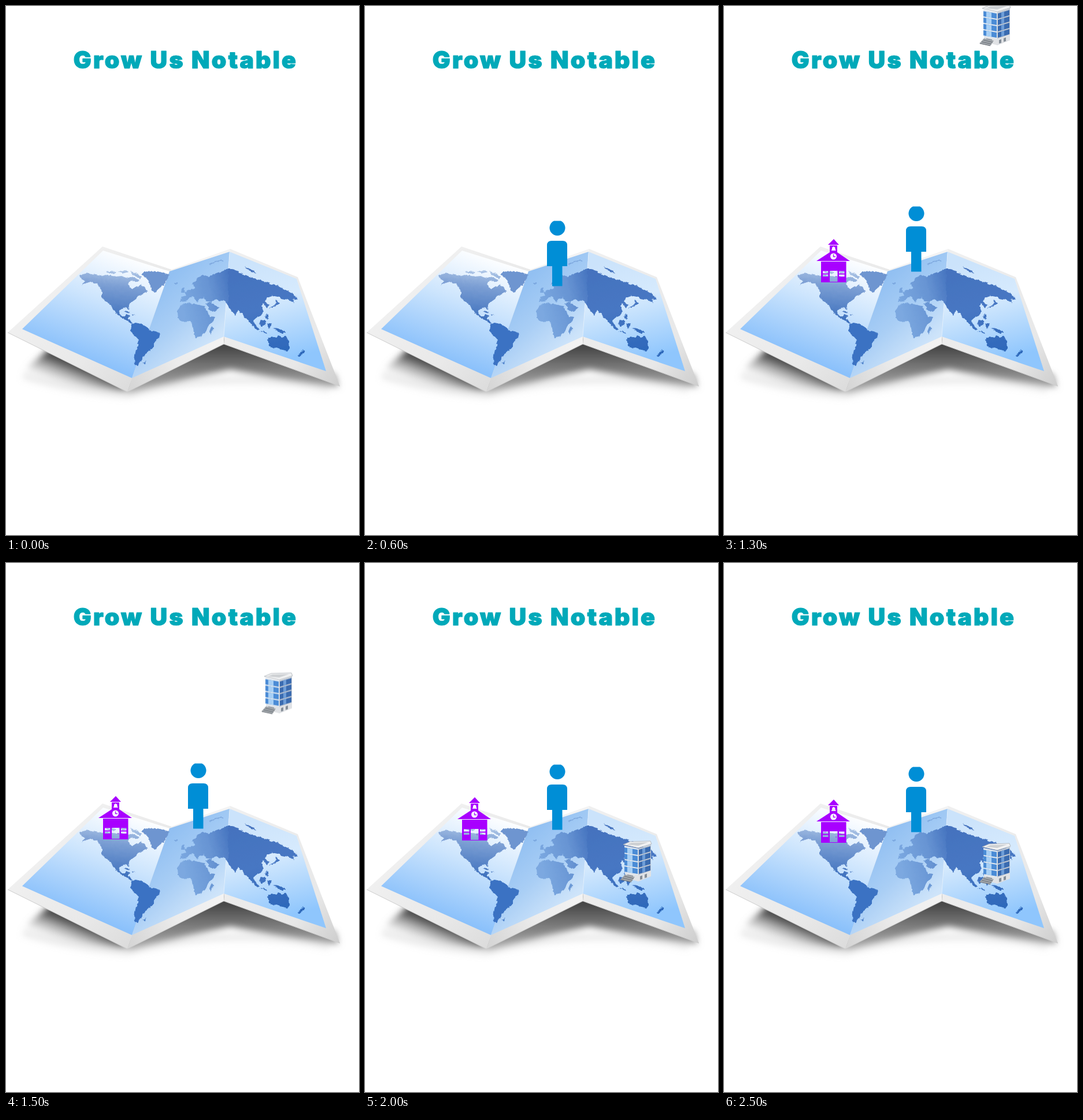
An HTML page for the animation above (2600 ms loop, 611 px wide and 917 px high).

```html
<!DOCTYPE html>
<html lang="en">
<head>
<meta charset="utf-8">
<title>Map drop</title>
<style>
html, body { margin: 0; width: 100%; height: 100%; overflow: hidden; background: #fff; }
svg { display: block; width: 611px; height: 917px; }
.title { font: 900 41px Inter, "Open Sans", sans-serif; letter-spacing: 3.2px; fill: #00a9b9; stroke: #00a9b9; stroke-width: 1.2; stroke-linejoin: round; }
#person, #school, #office, #icons { animation: 2600ms step-end infinite; }
#person { animation-name: person; }
#school { animation-name: school; }
#office { animation-name: office; }
#icons { animation-name: shake; }

@keyframes person {
  0% { transform: translateY(-600px); }
  7.69% { transform: translateY(-413px); animation-timing-function: steps(4); }
  23.07% { transform: translateY(25px); }
  30.76%, 100% { transform: none; }
}
@keyframes school {
  0% { transform: translateY(-600px); }
  30.76% { transform: translateY(-390px); }
  34.61% { transform: translateY(-290px); animation-timing-function: steps(3); }
  46.15% { transform: translateY(9px); }
  49.99%, 100% { transform: none; }
}
@keyframes office {
  0% { transform: translateY(-700px); }
  49.99% { transform: translateY(-482px); animation-timing-function: steps(4); }
  65.38% { transform: translateY(-97px); }
  69.22%, 100% { transform: none; }
}
@keyframes shake {
  0% { transform: none; }
  73.07% { transform: translateY(9px); }
  76.92% { transform: translateY(2px); }
  80.76% { transform: translateY(-5px); animation-timing-function: steps(4); }
  96.15%, 100% { transform: translateY(6px); }
}
</style>
</head>
<body>
<svg viewBox="0 0 611 917">
  <defs>
    <linearGradient id="paperL" gradientUnits="userSpaceOnUse" x1="60" y1="500" x2="210" y2="669">
      <stop offset="0" stop-color="#f0f0f0"/><stop offset=".6" stop-color="#e9e9e9"/><stop offset="1" stop-color="#dcdcdc"/>
    </linearGradient>
    <linearGradient id="paperM" gradientUnits="userSpaceOnUse" x1="215" y1="660" x2="380" y2="580">
      <stop offset="0" stop-color="#d6d6d6"/><stop offset=".5" stop-color="#ececec"/><stop offset="1" stop-color="#f3f3f3"/>
    </linearGradient>
    <linearGradient id="paperR" gradientUnits="userSpaceOnUse" x1="385" y1="480" x2="578" y2="650">
      <stop offset="0" stop-color="#efefef"/><stop offset=".7" stop-color="#e8e8e8"/><stop offset="1" stop-color="#cfcfcf"/>
    </linearGradient>
    <linearGradient id="seaL" gradientUnits="userSpaceOnUse" x1="185" y1="425" x2="120" y2="605">
      <stop offset="0" stop-color="#fdfeff"/><stop offset=".45" stop-color="#cde5fd"/><stop offset="1" stop-color="#8bc1fb"/>
    </linearGradient>
    <linearGradient id="seaM" gradientUnits="userSpaceOnUse" x1="270" y1="480" x2="360" y2="580">
      <stop offset="0" stop-color="#92c0f2"/><stop offset=".5" stop-color="#a9cef5"/><stop offset="1" stop-color="#cee4fa"/>
    </linearGradient>
    <linearGradient id="seaR" gradientUnits="userSpaceOnUse" x1="430" y1="440" x2="475" y2="615">
      <stop offset="0" stop-color="#cbe3fb"/><stop offset=".4" stop-color="#d6eafd"/><stop offset="1" stop-color="#8fc6fd"/>
    </linearGradient>
    <linearGradient id="landL" gradientUnits="userSpaceOnUse" x1="205" y1="455" x2="195" y2="545">
      <stop offset="0" stop-color="#b3cae8"/><stop offset=".35" stop-color="#7c9fd4"/><stop offset="1" stop-color="#3d70bd"/>
    </linearGradient>
    <linearGradient id="landM" gradientUnits="userSpaceOnUse" x1="300" y1="500" x2="386" y2="480">
      <stop offset="0" stop-color="#7ba8e0"/><stop offset=".6" stop-color="#6794d3"/><stop offset="1" stop-color="#4a78c2"/>
    </linearGradient>
    <linearGradient id="landR" gradientUnits="userSpaceOnUse" x1="410" y1="455" x2="450" y2="600">
      <stop offset="0" stop-color="#4472be"/><stop offset=".5" stop-color="#4777c3"/><stop offset="1" stop-color="#2f69bb"/>
    </linearGradient>
    <linearGradient id="shadeL" gradientUnits="userSpaceOnUse" x1="140" y1="632" x2="126" y2="668">
      <stop offset="0" stop-color="#4c4c4c"/><stop offset="1" stop-color="#aaa" stop-opacity=".1"/>
    </linearGradient>
    <linearGradient id="shadeR" gradientUnits="userSpaceOnUse" x1="375" y1="590" x2="375" y2="668">
      <stop offset="0" stop-color="#444"/><stop offset=".45" stop-color="#777"/><stop offset="1" stop-color="#aaa"/>
    </linearGradient>
    <filter id="soft" x="-20%" y="-40%" width="140%" height="180%"><feGaussianBlur stdDeviation="6"/></filter>
    <filter id="coast" x="-5%" y="-5%" width="110%" height="110%">
      <feTurbulence type="fractalNoise" baseFrequency=".16" numOctaves="2" seed="4"/>
      <feDisplacementMap in="SourceGraphic" scale="5" xChannelSelector="R" yChannelSelector="G"/>
    </filter>
  </defs>

  <rect width="611" height="917" fill="#fff"/>
  <text class="title" x="311" y="108" text-anchor="middle">Grow Us Notable</text>

  <g id="shadow" filter="url(#soft)">
    <path d="M34 628L80 590L205 650L208 668Q90 658 34 628Z" fill="url(#shadeL)"/>
    <path d="M205 655L377 560L570 640L576 661Q480 648 388 630Q300 648 212 671Z" fill="url(#shadeR)"/>
    <path d="M30 640Q110 666 210 674Q390 628 560 664" fill="none" stroke="#bbb" stroke-width="12" opacity=".3"/>
  </g>

  <g id="paper">
    <path d="M3 566L167 417L287 457L210 669Z" fill="url(#paperL)"/>
    <path d="M286 457L388 421L377 586L210 669Z" fill="url(#paperM)"/>
    <path d="M388 421L505 470L578 659L377 586Z" fill="url(#paperR)"/>
    <path d="M3 566L210 669L377 586L578 659" fill="none" stroke="#cdcdcd" stroke-width="1"/>
    <path d="M28 560L168 424L283 460L218 645Z" fill="url(#seaL)"/>
    <path d="M283 460L387 426L377 573L218 645Z" fill="url(#seaM)"/>
    <path d="M387 426L503 473L554 633L377 573Z" fill="url(#seaR)"/>
    <path d="M387 426L377 573" stroke="#fff" stroke-opacity=".35"/>
  </g>

  <g id="land" filter="url(#coast)">
    <g fill="url(#landL)">
      <path d="M128 468L136 463L150 465L165 468L176 466L190 469L200 468L212 472L222 470L231 476L226 479L217 475L211 482L218 490L224 487L230 485L234 482L240 488L245 495L238 499L229 503L225 508L218 513L213 519L212 527L208 523L198 526L196 533L201 538L206 538L209 534L214 536L211 542L218 549L223 551L216 550L208 545L198 539L190 531L185 526L182 519L174 513L167 506L167 497L163 488L156 481L147 478L139 480L130 485L138 477L130 473Z"/>
      <path d="M173 461L184 459L190 463L180 464ZM194 460L206 458L212 461L204 463ZM214 460L224 462L235 470L232 474L222 467ZM204 529L210 529L216 533L210 532ZM218 534L224 536L219 537Z"/>
    </g>
    <path d="M234 464L246 459L263 460L282 465L280 473L275 481L268 487L262 492L257 497L252 492L249 484L247 476L240 469Z" fill="#6e95d0"/>
    <path d="M217 552L224 549L234 551L243 556L248 562L258 564L267 567L265 575L258 583L254 592L247 598L241 603L236 610L231 617L228 625L223 621L222 612L224 600L228 589L229 578L222 570L215 563Z" fill="#3a72c3"/>
    <path d="M236 618L243 616L240 620Z" fill="#4b7fc9"/>
    <g fill="url(#landM)">
      <path d="M301 513L304 504L312 502L309 496L318 492L327 488L323 481L330 473L341 466L351 469L364 463L376 459L387 454L384 517L377 509L370 513L364 507L356 513L348 512L342 505L336 508L331 513L325 504L318 505L312 512Z"/>
      <path d="M296 530L303 518L317 515L328 517L343 520L349 530L355 538L361 539L357 548L350 555L345 566L337 574L328 575L325 565L323 553L319 547L306 548L297 541Z"/>
      <path d="M345 516L354 513L361 519L369 523L359 531L353 528ZM356 555L359 558L354 569L352 565ZM304 489L310 488L308 496L303 497ZM290 480L297 480L295 484Z"/>
      <path d="M352 448L362 443L376 441" fill="none" stroke="#7fa9df" stroke-width="2"/>
    </g>
    <g fill="url(#landR)">
      <path d="M385 454L395 457L405 463L416 467L430 472L445 477L460 482L478 489L492 496L503 504L505 510L496 508L499 515L488 509L478 507L470 503L463 502L452 506L448 512L456 518L450 523L446 516L442 520L446 530L441 537L434 540L428 545L431 552L426 554L420 545L414 541L408 533L401 528L397 536L391 529L384 520Z"/>
      <path d="M413 452L424 457L434 464L424 461ZM468 510L474 515L469 518L461 523L455 525L465 518Z"/>
      <path d="M423 545L431 551L439 561L435 562L427 554ZM441 545L448 543L450 552L443 556L438 551ZM438 563L452 565L451 568ZM452 551L459 550L456 560ZM463 558L474 559L485 567L475 567ZM449 533L453 536L454 544L450 540Z"/>
      <path d="M453 577L460 573L468 575L472 571L479 574L484 571L490 582L491 592L486 599L478 597L470 592L460 593L455 589Z"/>
      <path d="M515 596L517 600L508 608L505 606Z"/>
    </g>
  </g>

  <g id="icons">
    <g id="school" fill="#a800ff" fill-rule="evenodd">
      <path d="M190 404L199 414H180Z"/>
      <path d="M183 415H196V427L218 442H160L183 427ZM186 424H193.500V423L192.500 421.500V419Q189.700 415 187 419V421.500L186 423ZM184 434A5.500 5.500 0 1 0 195 434A5.500 5.500 0 1 0 184 434Z"/>
      <path d="M189.500 430.500V434.500H193" fill="none" stroke="#a800ff" stroke-width="1.300"/>
      <path d="M168 443H211.500V479H168ZM171 459.500H180.500V463.500H171ZM171 465.500H180.500V469H171ZM199 459.500H208.500V463.500H199ZM199 465.500H208.500V469H199ZM183 459H196.500V478H183Z"/>
      <path d="M194 468V470" stroke="#a800ff" stroke-width="1"/>
    </g>

    <g id="person" fill="#008ed6">
      <path d="M327 347.500H339A13.500 13.500 0 1 1 327 347.500Z"/>
      <path d="M315 426V390Q315 382 323 382H342Q350 382 350 390V426H341.500V460.500H324V426Z"/>
    </g>

    <g id="office">
      <g transform="translate(0 97)">
        <path d="M449 391L473 396V453L450 441Z" fill="#e3e9ef"/>
        <path d="M473 396L495 389V444L473 453Z" fill="#c3cad3"/>
        <path d="M447 389L459 384L494 383L496 388L473 395Z" fill="#f1f2f3" stroke="#a9aeb4" stroke-width=".8"/>
        <path d="M453 389L461 386L490 385L473 391Z" fill="#cdd0d3"/>
        <g id="glass">
          <path d="M449 394L472 398V407L449 403Z" fill="#4b8cd6"/>
          <path d="M474 398L494 392V401L474 407Z" fill="#3a6bb0"/>
          <path d="M454 395L463 396.500V405.500L454 404Z" fill="#a7cff5"/>
          <path d="M480 396L485 394.500V403.500L480 405Z" fill="#6d9dd8"/>
        </g>
        <use href="#glass" y="11"/>
        <use href="#glass" y="22"/>
        <use href="#glass" y="33"/>
        <path d="M450 438L473 442L495 434V444L473 453L462 450Z" fill="#e0e2e5"/>
        <path d="M454 441L464 443V449L454 446ZM476 444L480 442.500V449L476 450ZM484 441L488 439.500V446L484 447Z" fill="#858e98"/>
        <path d="M442 450L450 441L467 445L461 454Z" fill="#a2a7ac"/>
        <path d="M443 450L461 454M446 447L463 451M449 444L465 448" stroke="#666c73" stroke-width="1"/>
      </g>
    </g>
  </g>
</svg>
</body>
</html>
```
